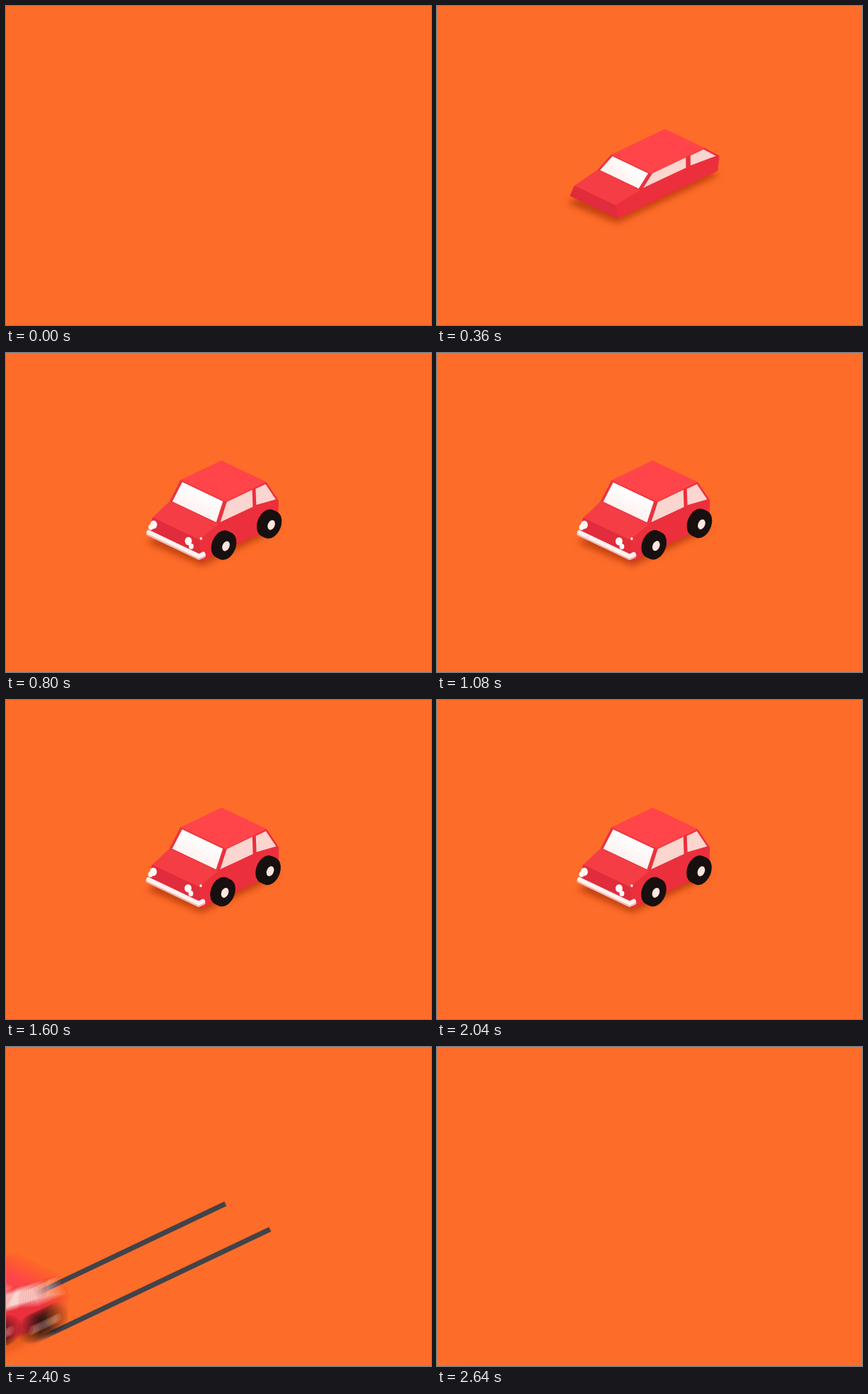
An HTML page with a canvas that plays this animation: 600x450 px, repeating every 3040 ms.

```html
<!DOCTYPE html>
<html lang="en">
<head>
<meta charset="utf-8">
<title>Little red car</title>
<style>
html, body { margin: 0; width: 100%; height: 100%; overflow: hidden; background: #fe6c29; }
canvas { display: block; width: 600px; height: 450px; }
</style>
</head>
<body>
<canvas id="stage" width="600" height="450"></canvas>
<script>
const LOOP = 3040, STEP = 40, LAUNCH = 2106, SLOPE = 0.475, REAR_AXLE = 41, FRONT_AXLE = -23;
const stage = document.getElementById('stage').getContext('2d');
const buffer = document.createElement('canvas');
buffer.width = 600;
buffer.height = 450;
const ctx = buffer.getContext('2d');

const clamp = x => Math.min(1, Math.max(0, x));
const progress = (t, start, end) => clamp((t - start) / (end - start));
const smooth = p => p * p * (3 - 2 * p);

// Damped spring from 0 to 1
function spring(t, start, decay, period = Infinity) {
  const s = t - start;
  return s < 0 ? 0 : 1 - Math.exp(-s / decay) * Math.cos(2 * Math.PI * s / period);
}

function drift(t) {
  const nudge = 17 * Math.sin(Math.PI * progress(t, 1640, 2040)) ** 2;
  return nudge + 112 * (Math.max(0, t - LAUNCH) / 174) ** 2;
}

// u runs to the rear, v to the near side, z up; all in screen pixels
const project = (u, v, z, d) => [292 + u + v - d, 250 + SLOPE * (v - u + d) - z];

function carPose(t) {
  const launch = smooth(progress(t, 2090, 2250));
  const length = spring(t, 190, 145, 330) * (1 + 0.05 * launch);
  const width = spring(t, 190, 80);
  const height = spring(t, 318, 90, 320);
  const cos = Math.cos(0.165 * launch), sin = Math.sin(0.165 * launch), d = drift(t);
  // The body pitches around the rear axle
  const at = (u, v, z) => {
    const x = (u * length - REAR_AXLE) / 0.707, y = (z * height - 8) / 0.88;
    return project(REAR_AXLE + (x * cos + y * sin) * 0.707, v * width,
      8 + (y * cos - x * sin) * 0.88 + 2 * launch, d);
  };
  const ground = (u, v) => project(u * length, v * width, -5, d);
  return { at, ground, launch };
}

function path(points) {
  ctx.beginPath();
  points.forEach(p => ctx.lineTo(...p));
}

function poly(color, points) {
  path(points);
  ctx.closePath();
  ctx.fillStyle = color;
  ctx.fill();
}

function stroke(color, width, points, cap = 'round') {
  path(points);
  ctx.strokeStyle = color;
  ctx.lineWidth = width;
  ctx.lineCap = cap;
  ctx.lineJoin = 'round';
  ctx.stroke();
}

function disc(color, [x, y], r) {
  ctx.save();
  ctx.transform(0.74, -0.27, 0, 0.93, x, y);
  ctx.beginPath();
  ctx.arc(0, 0, r, 0, 7);
  ctx.fillStyle = color;
  ctx.fill();
  ctx.restore();
}

function drawWheel(at, u, t, start) {
  const size = spring(t, start, 50, 240);
  if (size <= 0) return;
  const face = 40 + 6 * Math.exp((start - t) / 200);
  for (let v = face - 6; v <= face; v++) disc('#17100f', at(u, v, 8), 20 * size);
  disc('#fde6e1', at(u, face, 8), 7.2 * size);
}

function drawTracks(t, d) {
  const tail = 420 * smooth(progress(t, 2400, 2640));
  if (t < LAUNCH || d <= tail) return;
  ctx.filter = 'blur(0.7px)';
  for (const [x, y] of [[373, 257], [310, 221]])
    stroke('#41434a', 7, [tail, d].map(s => [x - s, y + SLOPE * s]), 'butt');
  ctx.filter = 'none';
}

function drawShadow({ ground, launch }) {
  ctx.filter = 'blur(5px)';
  poly(`rgba(165, 45, 0, ${0.65 - 0.4 * launch})`,
    [ground(-60, -34), ground(-56, 40), ground(54, 40), ground(54, -34)]);
  ctx.filter = 'none';
}

// Outline of the near side, from the rear of the roof down to the nose
const roofRear = [44, 31.5, 62], roofFront = [-14, 31.5, 62], beltFront = [-27, 34, 37];
const hoodFront = [-53, 32.5, 27], noseBottom = [-54, 38, 0];
const profile = [roofRear, roofFront, beltFront, hoodFront, noseBottom];
const pillarTop = [27, 31.5, 62], pillarBottom = [25, 34.5, 37], beltRear = [57, 36, 32];
const mirror = ([u, v, z]) => [u, -v, z];

function drawBody(at) {
  const face = (color, points) => {
    const outline = points.map(p => at(...p));
    poly(color, outline);
    stroke(color, 0.7, [...outline, outline[0]]);
  };
  const glass = (color, points, scale) => {
    const center = [0, 1, 2].map(i => points.reduce((sum, p) => sum + p[i] / points.length, 0));
    poly(color, points.map(p => at(...p.map((x, i) => center[i] + (x - center[i]) * scale))));
  };
  face('#ec2f3c', [...profile, [54, 38, 0], beltRear]);
  ['#ff4549', '#e93440', '#f53d45', '#e02c3c'].forEach((color, i) => {
    const [a, b] = profile.slice(i, i + 2);
    face(color, [a, b, mirror(b), mirror(a)]);
  });
  const shine = ctx.createLinearGradient(...at(-14, 0, 60), ...at(-27, 0, 37));
  shine.addColorStop(0, '#fff');
  shine.addColorStop(1, '#fdf1ef');
  glass(shine, [roofFront, mirror(roofFront), mirror(beltFront), beltFront], 0.91);
  glass('#fbd5cf', [roofFront, pillarTop, pillarBottom, beltFront], 0.88);
  glass('#fbd5cf', [pillarTop, roofRear, beltRear, pillarBottom], 0.83);
}

function drawLights(at, t) {
  const size = spring(t, 440, 50, 240);
  const light = (x, y, r) => {
    ctx.beginPath();
    ctx.ellipse(x, y, r * 0.85 * size, r * size, 0, 0, 7);
    ctx.fillStyle = '#fff8f5';
    ctx.fill();
  };
  if (size <= 0) return;
  for (const v of [-30, 19]) {
    light(...at(-54, v, 19), 5.8);
    light(...at(-54, v + 4 * Math.sign(v), 13.5), 4);
  }
  light(...at(-46, 29, 23.6), 2);
}

function drawBumper(at, t) {
  const grown = progress(t, 480, 645);
  if (!grown) return;
  const edge = z => {
    const points = [at(-57, -34, z), at(-57, -34 + 71 * grown, z)];
    return grown < 1 ? points : [...points, at(-52, 38, z + 1)];
  };
  stroke('#eebab5', 7, edge(6));
  stroke('#fff2ef', 6, edge(8));
}

function drawScene(t) {
  const d = drift(t);
  ctx.fillStyle = '#fe6c29';
  ctx.fillRect(0, 0, 600, 450);
  drawTracks(t, d);
  if (t < 200 || d > 520) return;
  const pose = carPose(t), { at } = pose;
  drawShadow(pose);
  drawBody(at);
  drawWheel(at, REAR_AXLE, t, 575);
  drawWheel(at, FRONT_AXLE, t, 500);
  drawLights(at, t);
  drawBumper(at, t);
}

function frame(now) {
  const t = Math.floor(now % LOOP / STEP) * STEP;
  const moving = t > LAUNCH && t < 2480;
  const samples = moving ? 12 : 1;
  // Running average over the open shutter gives the motion blur
  for (let i = 0; i < samples; i++) {
    drawScene(moving ? t + 18 * ((i + 0.5) / samples - 0.5) : t);
    stage.globalAlpha = 1 / (i + 1);
    stage.drawImage(buffer, 0, 0);
  }
  requestAnimationFrame(frame);
}
requestAnimationFrame(frame);
</script>
</body>
</html>
```
